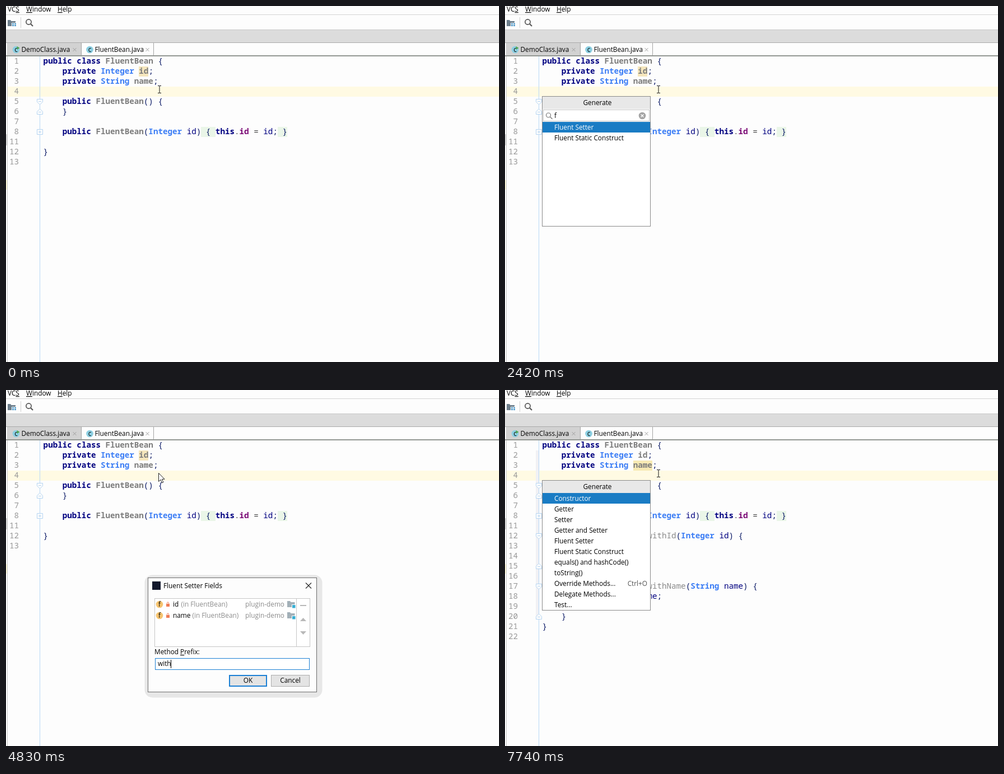
These frames come from a looping animation (880x636 px, 8 s). An HTML page:

```html
<!DOCTYPE html>
<html lang="en">
<head>
<meta charset="utf-8">
<title>Generate fluent setters</title>
<style>
html, body { margin: 0; width: 100%; height: 100%; overflow: hidden; background: #fdfdfd; }
svg { display: block; width: 880px; height: 636px; }
text { white-space: pre; font: 11.8px "Open Sans", "Noto Sans", sans-serif; fill: #000; }
.code { font: 14.22px "Noto Sans Mono", "DejaVu Sans Mono", monospace; fill: #0b1a66; }
.num { fill: #999; text-anchor: end; }
.k { font-weight: bold; fill: #000080; }
.t { font-weight: bold; fill: #3b7df5; }
.g { font-weight: bold; fill: #7c7c7c; }
.w { fill: #8a8a8a; }
.f { font-weight: bold; fill: #7a0874; }
.p { fill: #000080; }
.o { fill: #444; }
.raw :is(.t, .w, .f, .p) { fill: #111; font-weight: normal; }
.mid { text-anchor: middle; }
.end { text-anchor: end; }
.dim { fill: #8c8c8c; }
.key { fill: #555; }
.sel { fill: #fff; }
.u { text-decoration: underline; }
</style>
</head>
<body>
<svg id="stage" viewBox="0 0 880 636"></svg>
<script>
const LOOP = 8000, COL = 8.53, ROW = 18, LEFT = 66.6;
const rowTop = row => 90 + ROW * (row - 1);

const rect = (x, y, w, h, fill, more = '') =>
  `<rect x="${x}" y="${y}" width="${w}" height="${h}" fill="${fill}" ${more}/>`;
const box = (x, y, w, h, fill, stroke) => rect(x + .5, y + .5, w - 1, h - 1, fill, `stroke="${stroke}"`);
const path = (d, stroke, fill = 'none', width = 1) =>
  `<path d="${d}" stroke="${stroke}" fill="${fill}" stroke-width="${width}"/>`;
const circle = (x, y, r, fill, more = '') => `<circle cx="${x}" cy="${y}" r="${r}" fill="${fill}" ${more}/>`;
const text = (x, y, s, cls = '') => `<text x="${x}" y="${y}" class="${cls}">${s}</text>`;
const group = (id, ...parts) => `<g id="${id}">${parts.join('')}</g>`;

// "[kword]" gives "word" the class k
const code = (row, s) => text(LEFT, rowTop(row) + 13,
  s.replace(/[.=]/g, '[o$&]').replace(/\[(\w)([\w.=]+)\]/g, '<tspan class="$1">$2</tspan>'), 'code');
const lineNo = (row, n) => text(23, rowTop(row) + 13, n, 'code num');
const mark = (row, col, n, fill) =>
  rect(Math.round(LEFT + col * COL), rowTop(row), Math.round(n * COL), ROW, fill);

function fold(row, kind) {
  const y = rowTop(row) + 4;
  const shape = {
    down: `M55.5 ${y + .5}h10v5l-5 4.5l-5 -4.5z M58 ${y + 4.5}h5`,
    up: `M55.5 ${y + 9.5}h10v-5l-5 -4.5l-5 4.5z M58 ${y + 5.5}h5`,
    plus: `M55.5 ${y + .5}h10v9h-10z M58 ${y + 5}h5 M60.5 ${y + 2.5}v5`
  }[kind];
  return path(shape, '#b5d4f1', '#fdfdfd');
}

const closeMark = x => path(`M${x - 3} 75l6 6m0 -6l-6 6`, '#a0a0a0');
const classIcon = x => circle(x, 78, 6.3, '#8ccfe2') + text(x, 81.5, 'c', 'mid');

const frame = group('frame',
  rect(0, 0, 880, 636, '#fdfdfd'),
  rect(0, 15, 880, 1, '#d4d4d4'),
  text(3, 10, 'VC<tspan class="u">S</tspan>'),
  text(36, 10, '<tspan class="u">W</tspan>indow'),
  text(92, 10, '<tspan class="u">H</tspan>elp'),
  path('M3 25h5l1.5 2H17v3h-7v6H3z', 'none', '#6e7f8c'),
  [[11, 31], [15, 31], [11, 34], [15, 34]].map(([x, y]) => rect(x, y, 3, 2, '#3d8fc4')).join(''),
  rect(26, 20, 1, 19, '#d0d0d0'),
  circle(40.5, 28.5, 4.6, 'none', 'stroke="#555" stroke-width="1.7"'),
  path('M44 32l4 4', '#555', 'none', 2.2),
  rect(0, 42, 880, 24, '#dcdcdc'),
  rect(0, 42, 880, 1, '#c8c8c8'), rect(0, 65, 880, 1, '#aaa'),
  rect(2, 66, 132, 23, '#d2d2d2'),
  rect(2, 66, 1, 570, '#c8c8c8'),
  rect(134, 66, 1, 23, '#a4a4a4'), rect(263, 66, 1, 23, '#a4a4a4'),
  rect(0, 88, 880, 2, '#939793'),
  classIcon(18), path('M19.5 72l5 3l-5 3z', 'none', '#4fa64f'),
  text(27.5, 82, 'DemoClass.java'), closeMark(122.5),
  classIcon(149.5), text(158.5, 82, 'FluentBean.java'), closeMark(252.5),
  rect(0, 229, 2, 20, '#d6d6d6'), rect(0, 311, 2, 17, '#fbf6d8'),
  rect(3, rowTop(4), 877, ROW, '#fffae3'));

const bars = group('bars', rect(55, 108, 5, 302, '#f1f1f4'));

const common = group('common',
  rect(60, 90, 1, 546, '#b8d8f6'),
  [1, 2, 3, 4, 5, 6, 7, 8, 11, 12, 13].map((n, i) => lineNo(i + 1, n)).join(''),
  mark(8, 33, 3, '#eaf6e8'), mark(8, 49, 2, '#eaf6e8'),
  code(1, '[kpublic] [kclass] [gFluentBean] {'),
  code(2, '    [kprivate] [tInteger] [gid];'),
  code(3, '    [kprivate] [tString] [gname];'),
  code(5, '    [kpublic] [gFluentBean]() {'),
  code(6, '    }'),
  code(8, '    [kpublic] [gFluentBean]([tInteger] [pid]) { [kthis].[fid] = [pid]; }'),
  fold(5, 'down'), fold(6, 'up'), fold(8, 'plus'));

const setter = (row, method, type, field) =>
  code(row, `    [kpublic] [tFluentBean] [w${method}]([t${type}] [p${field}]) {`) +
  code(row + 1, `        [kthis].[f${field}] = [p${field}];`) +
  code(row + 2, '        [kreturn] [kthis];') +
  code(row + 3, '    }');

const before = group('before', code(10, '}'));
const after = group('after',
  Array.from({ length: 9 }, (_, i) => lineNo(12 + i, 14 + i)).join(''),
  setter(10, 'withId', 'Integer', 'id'),
  setter(15, 'withName', 'String', 'name'),
  code(19, '}'));
const extras = group('extras', [10, 15].map(row =>
  fold(row, 'down') + fold(row + 3, 'up') + rect(103, rowTop(row + 1), 1, 2 * ROW, '#f0d3e6')).join(''));

const items = ['Constructor', 'Getter', 'Setter', 'Getter and Setter', 'Fluent Setter',
  'Fluent Static Construct', 'equals() and hashCode()', 'toString()',
  'Override Methods...', 'Delegate Methods...', 'Test...'];
const list = (top, names, chosen) => names.map((name, i) =>
  (i == chosen ? rect(67, top + 19 * i, 192, 19, '#1a7cc4') : '') +
  text(88, top + 14 + 19 * i, name, i == chosen ? 'sel' : '')).join('');

const popup = group('popup',
  box(66, 161, 194, 233, '#fff', '#8a8a8a'),
  rect(67, 162, 192, 22, '#e8e8e8'),
  text(165, 177, 'Generate', 'mid'));
const menu = group('menu', list(184, items, 0), text(254, 350, 'Ctrl+O', 'end key'));
const search = group('search',
  box(68, 185, 190, 21, '#fff', '#c4c4c4'),
  circle(77.5, 195, 4, 'none', 'stroke="#777" stroke-width="1.2"'), path('M80.5 198l4 4', '#777', 'none', 1.3),
  text(88, 200, 'f'),
  circle(245, 196, 6.3, '#a4a4a4'), path('M242.5 193.5l5 5m0 -5l-5 5', '#fff', 'none', 1.3));
const found = [0, 1].map(i => group('found' + i, list(207, items.slice(4, 6), i))).join('');

const fieldRow = (y, name, x) =>
  circle(274, y, 6.3, '#f6c470') + text(274, y + 4, 'f', 'mid') +
  rect(286, y - 1, 6, 5, '#ee7d56') + path(`M287.5 ${y - 1}v-1.5a1.5 1.5 0 0 1 3 0v1.5`, '#ee7d56') +
  text(298, y + 4, name) + text(x, y + 4, '(in FluentBean)', 'dim') +
  text(497, y + 4, 'plugin-demo', 'end dim') +
  path(`M502 ${y - 6}h5l1.5 2h7v9h-13.5z`, 'none', '#a3b0b8') +
  rect(510, y, 7, 7, '#fff') + rect(511, y + 1, 5.5, 5.5, '#38afd4');

const dialog = group('dialog',
  rect(247.5, 330.5, 317, 219, '#e7e7e7', 'rx="14"'),
  box(253, 335, 302, 205, '#fdfdfd', '#6c6c6c'),
  rect(261, 342, 15, 15, '#12182c'),
  text(281, 354, 'Fluent Setter Fields'),
  path('M535 344.5l10 10m0 -10l-10 10', '#222', 'none', 1.1),
  box(265, 372, 278, 87, '#fff', '#c6c6c6'),
  rect(518, 373, 1, 85, '#c6c6c6'),
  fieldRow(383, 'id', 312.5), fieldRow(403, 'name', 332.5),
  rect(525, 384, 11, 2, '#b8b8b8'),
  path('M525 413l5.5 -6l5.5 6z M525 431l5.5 6l5.5 -6z', 'none', '#b8b8b8'),
  text(265, 472, 'Method <tspan class="u">P</tspan>refix:'),
  '<rect id="field" x="266.5" y="479.5" width="275" height="20" fill="#fff"/>',
  '<text id="typed" x="271" y="493"></text>',
  '<rect id="typeCaret" y="482" width="1" height="15" fill="#000"/>',
  '<rect id="ok"/>', text(432, 523, 'OK', 'mid'),
  box(473, 509, 69, 21, '#e4e4e4', '#adadad'), text(507.5, 523, 'Cancel', 'mid'));

const pointers =
  group('beam', path('M271 142.5h2.5l.5 .5l.5 -.5h2.5M274 143v12M271 155.5h2.5l.5 -.5l.5 .5h2.5', '#111')) +
  group('arrow', path('M272.5 148.5v15l3.5 -3.3l2.5 5.6l2.4 -1l-2.5 -5.5h4.6z', '#222', '#fff'));

document.getElementById('stage').innerHTML = [frame, bars,
  group('idMark', mark(2, 20, 2, '#f5e6bc')), group('nameMark', mark(3, 19, 4, '#f7eab4')),
  common, before, after, extras,
  group('caret', rect(67, 144, 2, 18, '#000')),
  popup, menu, search, found, dialog, pointers].join('');

const $ = id => document.getElementById(id);
const show = (id, on) => $(id).setAttribute('display', on ? 'inline' : 'none');
const set = (id, attrs) => { for (const a in attrs) $(id).setAttribute(a, attrs[a]); };

function draw(now) {
  const t = now % LOOP;
  const within = (a, b) => t >= a && t < b;
  const written = t >= 5350, analysed = t >= 5630;

  show('caret', within(280, 840) || within(5630, 6320) || within(6900, 7310));
  show('idMark', !analysed);
  show('nameMark', analysed);
  show('bars', analysed);
  show('extras', analysed);
  show('before', !written);
  show('after', written);
  set('after', { class: analysed ? '' : 'raw' });

  const menuOpen = within(1300, 1700) || t >= 7740;
  show('popup', menuOpen || within(1700, 2700));
  show('menu', menuOpen);
  show('search', within(1700, 2700));
  show('found0', within(2420, 2700));
  show('found1', within(1700, 2420));

  show('dialog', within(2700, 5350));
  const closing = t >= 5200;
  set('dialog', {
    opacity: closing ? .5 : 1,
    transform: closing ? 'translate(406 440) scale(.96) translate(-406 -440)' : ''
  });
  const pulse = t < 3790, focus = t >= 3940;
  set('ok', pulse
    ? { x: 398.5, y: 509.5, width: 67, height: 20, fill: '#e5f1fb', stroke: '#2a86cf', 'stroke-width': 1 }
    : { x: 399, y: 510, width: 66, height: 19, fill: '#e4e4e4', stroke: '#1c80d4', 'stroke-width': 2 });
  set('field', { stroke: focus ? '#1c80d4' : '#c0c0c0' });
  const typed = 'with'.slice(0, [4220, 4370, 4520, 4830].filter(at => t >= at).length);
  $('typed').textContent = typed;
  show('typeCaret', focus);
  set('typeCaret', { x: Math.round(271 + (typed ? $('typed').getComputedTextLength() - .7 : 0)) });

  show('arrow', within(2700, 5200));
  show('beam', !within(2700, 5200));
}

const start = performance.now();
function tick() {
  draw(performance.now() - start);
  requestAnimationFrame(tick);
}
tick();
</script>
</body>
</html>
```
